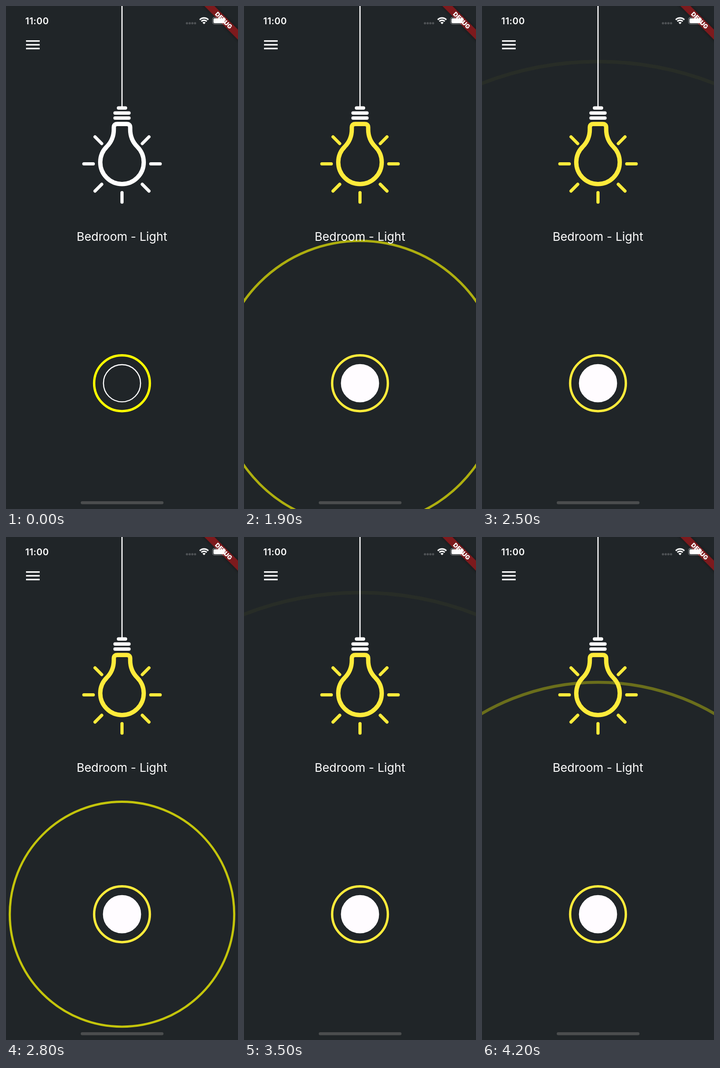
These frames come from a looping animation (509x1101 px, 4300 ms). An HTML page:

```html
<!DOCTYPE html>
<html lang="en">
<head>
<meta charset="utf-8">
<title>Bedroom light</title>
<style>
  html, body { margin: 0; width: 100%; height: 100%; overflow: hidden; background: #202528; }
  svg { display: block; width: 509px; height: 1101px; --glow: #fff; }
  text { font-family: Inter, "Liberation Sans", sans-serif; fill: #fff; }
  .line { fill: none; stroke-linecap: round; }
  .glow { stroke: var(--glow); }
  .ribbon { filter: drop-shadow(0 0 3.5px rgba(0, 0, 0, .5)); }
</style>
</head>
<body>
<svg viewBox="0 0 509 1101">
  <rect width="509" height="1101" fill="#202528"/>

  <circle id="pulse" cx="254.5" cy="825.7" fill="none" stroke="#ff0"/>

  <!-- menu -->
  <path d="M43.9 76.6h30M43.9 84.9h30M43.9 93.2h30" stroke="#fff" stroke-width="3.3"/>

  <!-- cord and socket -->
  <path d="M254.5 0V222" stroke="#fff" stroke-width="2.6"/>
  <path class="line" d="M246.8 223.2h15.4M239.2 234.2h30.6M239.2 245.3h30.6" stroke="#fff" stroke-width="7.4"/>

  <!-- bulb and rays -->
  <path class="line glow" stroke-width="9.5" d="M221 308C231 298 236.5 285 236.5 270V266Q236.5 258.3 244 258.3H265Q272.5 258.3 272.5 266V270C272.5 285 278 298 288 308A47.7 47.7 0 1 1 221 308Z"/>
  <path class="line glow" stroke-width="7" d="M170.8 345.6h20.7M317.6 345.6h20.7M254.5 408.6v20.7M195.3 286.4l14.7 14.7M313.7 286.4l-14.7 14.7M195.3 405l14.7-14.7M313.7 405l-14.7-14.7"/>

  <text x="254.3" y="514" font-size="26" text-anchor="middle">Bedroom - Light</text>

  <!-- button -->
  <circle id="rim" cx="254.5" cy="825.7" r="61.1" fill="none" stroke-width="5.2"/>
  <circle id="knob" cx="254.5" cy="825.7" r="40.7" stroke-width="2.4"/>

  <!-- corner ribbon -->
  <g transform="translate(509 0) rotate(45)">
    <rect class="ribbon" x="-60" y="36.5" width="120" height="15.7" fill="#7d1a1d"/>
    <text x="0" y="49.2" font-size="13.3" font-weight="900" text-anchor="middle">DEBUG</text>
  </g>

  <!-- status bar -->
  <text x="42.3" y="39.8" font-size="20" font-weight="600" letter-spacing=".4">11:00</text>
  <g fill="#4e5255">
    <circle cx="397" cy="37.8" r="2.5"/><circle cx="403" cy="37.8" r="2.5"/>
    <circle cx="408.9" cy="37.8" r="2.5"/><circle cx="414.8" cy="37.8" r="2.5"/>
  </g>
  <g fill="none" stroke="#fff" stroke-width="3.2">
    <path d="M425.1 30.1A13.3 13.3 0 0 1 443.9 30.1"/>
    <path d="M428.6 33.6A8.3 8.3 0 0 1 440.4 33.6"/>
  </g>
  <path d="M434.5 39.8L431.1 36.4A4.8 4.8 0 0 1 437.9 36.4Z" fill="#fff"/>
  <rect x="453.2" y="25" width="28.4" height="14.6" rx="4.2" fill="none" stroke="#fff" stroke-opacity=".4" stroke-width="1.3"/>
  <rect x="455.2" y="27" width="24.6" height="10.8" rx="2.4" fill="#fff"/>

  <rect x="164" y="1084" width="181.5" height="6.5" rx="3.25" fill="#4b4d4e"/>
</svg>
<script>
  const LOOP = 4300, LIT_AT = 1600, STEP = 100, PULSE_STEPS = 10;
  const stage = document.querySelector('svg');
  const [pulse, rim, knob] = ['pulse', 'rim', 'knob'].map(id => document.getElementById(id));

  function setAttrs(node, attrs) {
    for (const name in attrs) node.setAttribute(name, attrs[name]);
  }

  function draw(time) {
    const lit = time >= LIT_AT;
    stage.style.setProperty('--glow', lit ? '#ffeb3b' : '#fff');
    setAttrs(rim, { stroke: lit ? '#ffeb3b' : '#ff0' });
    setAttrs(knob, {
      fill: lit ? '#fffcff' : 'none',
      stroke: lit ? '#fffcff' : '#fff'
    });

    // The ring grows and fades evenly, once a second, in held steps.
    const k = Math.floor((time - LIT_AT) / STEP) % PULSE_STEPS;
    setAttrs(pulse, lit ? {
      r: 115.4 + 65.4 * k,
      'stroke-width': 4 + 0.42 * k,
      opacity: 0.935 - 0.1 * k
    } : { opacity: 0 });
  }

  const start = performance.now();
  function tick() {
    draw((performance.now() - start) % LOOP);
    requestAnimationFrame(tick);
  }
  tick();
</script>
</body>
</html>
```
